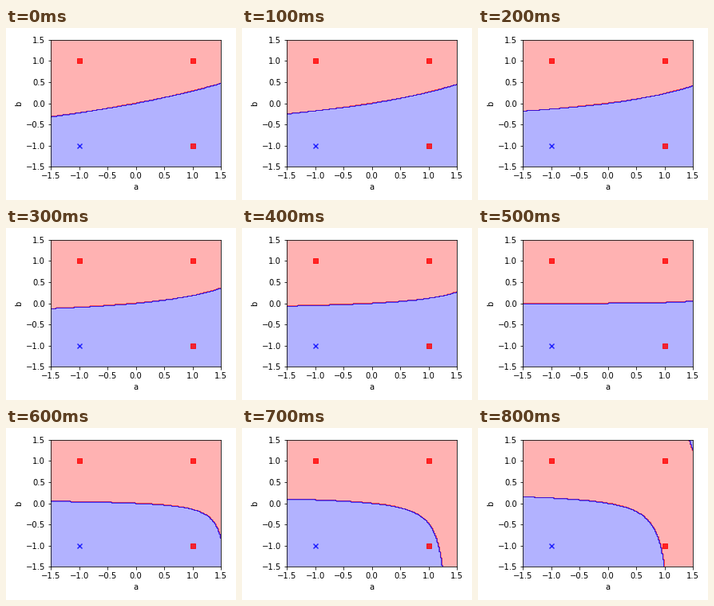
Recreate the animation shown at these times as a matplotlib script. Size 288x216 px, loop 900 ms.

```python
import numpy as np
import matplotlib.pyplot as plt
from matplotlib.animation import ArtistAnimation
from matplotlib.colors import ListedColormap

STEPS = 9
LIMIT = 1.5

plt.rcParams.update({"font.family": "DejaVu Sans", "font.size": 10})
fig, ax = plt.subplots(figsize=(4, 3), dpi=72)
ax.set(xlim=(-LIMIT, LIMIT), ylim=(-LIMIT, LIMIT), xlabel="a", ylabel="b")
ticks = np.linspace(-LIMIT, LIMIT, 7)
ax.set_xticks(ticks)
ax.set_yticks(ticks)
fig.tight_layout()

side = np.linspace(-LIMIT, LIMIT, 151)
a, b = np.meshgrid(side, side)
cmap = ListedColormap(["red", "blue"])


def classify(step):
    """Sign of a linear model with an interaction term, weights drifting evenly."""
    w_a = (-0.381 + 0.074 * step) / LIMIT
    w_b = 1 - 0.0477 * step
    w_ab = (-0.19 - 0.0747 * step) / LIMIT
    return np.where(w_a * a + w_b * b + w_ab * a * b >= 0, -1, 1)


def regions(step):
    return ax.contourf(a, b, classify(step), alpha=0.3, cmap=cmap, zorder=1)


ax.scatter([-1, 1, 1], [1, 1, -1], c="red", marker="s", alpha=0.8, zorder=2)
ax.scatter([-1], [-1], c="blue", marker="x", alpha=0.8, zorder=2)

anim = ArtistAnimation(fig, [[regions(k)] for k in range(STEPS)],
                       interval=100, repeat=True, repeat_delay=0)
plt.show()
```
